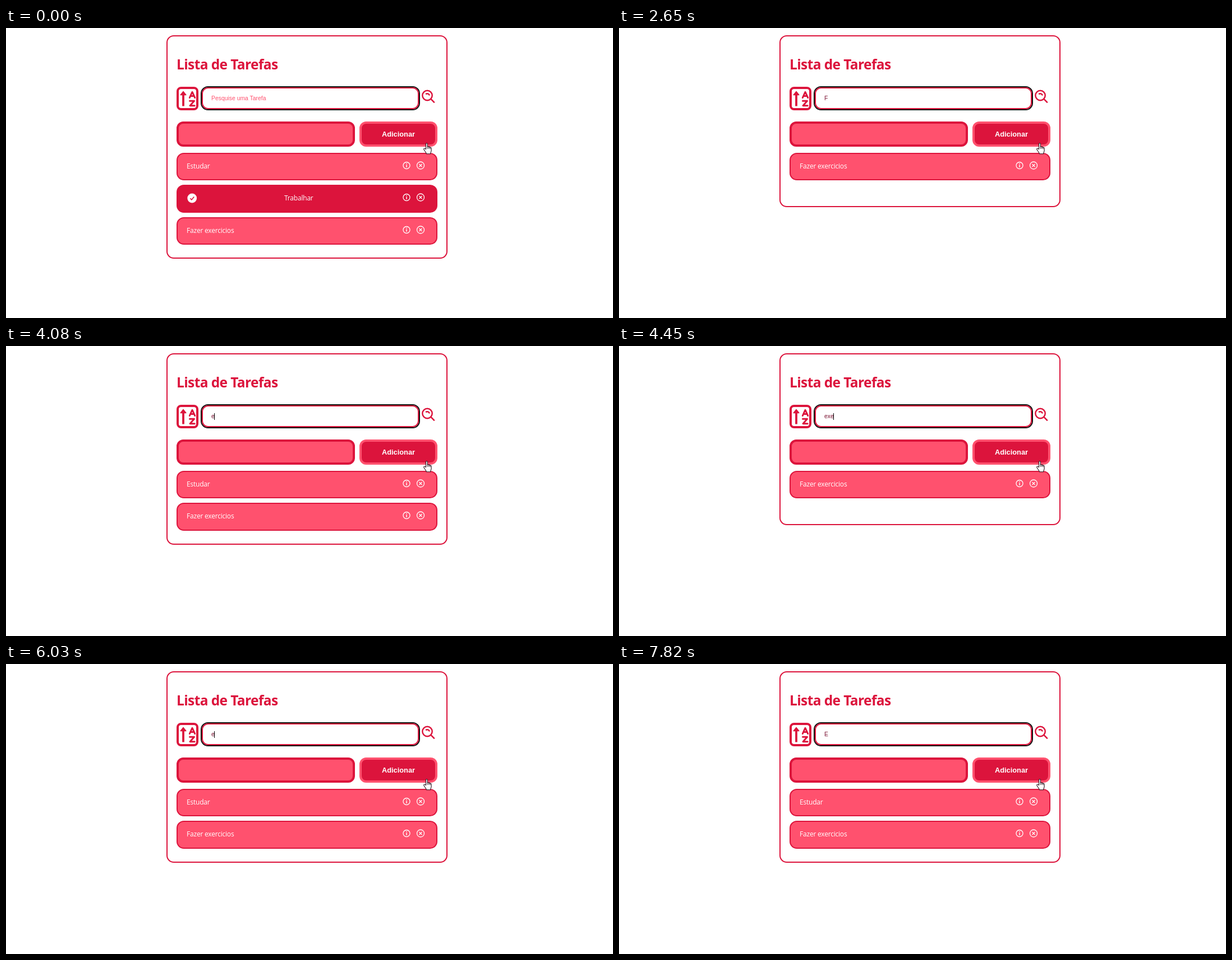
Write an HTML page that moves like this. It is 1082x518 px and loops after 8 s.

```html
<!DOCTYPE html>
<html lang="pt">
<head>
<meta charset="utf-8">
<title>Lista de Tarefas</title>
<style>
:root { --red: #dc143c; --pink: #ff516e; }
html, body { margin: 0; width: 100%; height: 100%; overflow: hidden; background: #fff; }
body * { position: absolute; box-sizing: border-box; white-space: pre; }
svg * { position: static; }
svg { left: 0; top: 0; overflow: visible; }
#card { left: 286px; top: 13px; width: 501px; border: 2px solid var(--red); border-radius: 13px; }
h1 { left: 304px; top: 48px; margin: 0; color: var(--red); font: bold 24.5px/34px "Open Sans", sans-serif; letter-spacing: -.6px; }
#sort { left: 304px; top: 105px; width: 39px; height: 42px; border: 4px solid var(--red); border-radius: 8px; }
#search { left: 347px; top: 104px; width: 391px; height: 43px; border: 2px solid #101010; border-radius: 13px; }
#search::after { content: ""; position: absolute; inset: 0; border: 2px solid var(--red); border-radius: 11px; }
#query { left: 366px; top: 118px; font: 10.4px/15px "Liberation Sans", Arial, sans-serif; color: #7c1433; }
#query.empty { color: var(--pink); }
#caret { top: 120px; width: 1px; height: 12px; }
#entry, #add { top: 167px; height: 45px; border: 4px solid var(--red); border-radius: 12px; background: var(--pink); }
#entry { left: 304px; width: 318px; }
#add { left: 630px; width: 139px; border-color: var(--pink); background: var(--red); color: #fff;
  font: bold 12.8px/37px "Liberation Sans", Arial, sans-serif; text-align: center; }
.task { left: 304px; width: 465px; height: 49.3px; border: 2px solid var(--red); border-radius: 13px; background: var(--pink);
  color: #fff; font: 12px/18px "Open Sans", sans-serif; letter-spacing: -.2px; }
.task span { left: 16px; top: 13px; }
.task.done { background: var(--red); }
.task.done span { left: 190px; }
</style>
</head>
<body>
<div id="card"></div>
<h1>Lista de Tarefas</h1>
<div id="sort"></div>
<div id="search"></div>
<div id="query"></div>
<div id="caret"></div>
<div id="entry"></div>
<div id="add">Adicionar</div>
<div id="list" style="left:0;top:0"></div>
<svg width="1082" height="518" fill="none">
  <g stroke="#dc143c">
    <path d="M316 139.500V117" stroke-width="3.800"/>
    <path d="M316 113.500l-4.800 6h9.600z" fill="#dc143c" stroke-width="1.500" stroke-linejoin="round"/>
    <path d="M327.300 124.500l4.500-10h.4l4.500 10M329.500 121.500h5M327.500 130.300h8l-7.500 8.400h8.200" stroke-width="3" stroke-linejoin="round" stroke-linecap="round"/>
    <circle cx="751" cy="120.500" r="8.700" stroke-width="2.500"/>
    <path d="M757.200 126.700l6.600 6.600M748.200 118.200a4 4 0 0 1 6.600 2.300" stroke-width="2.500"/>
  </g>
  <path d="M748.500 216.500v-9.200c0-2 2.800-2 2.800 0v5c.5-1 2.300-.8 2.500.6.600-.9 2.200-.5 2.300.7.700-.6 2 0 2 1.200v4.200c0 1.700-1.300 2.800-1.500 5.800h-7.200c-.2-2.400-2.700-4.400-4.500-7.800-.8-1.700 1.300-2.700 2.400-1.400z"
    fill="#fff" stroke="#26101a" stroke-width="1.100" stroke-linejoin="round"/>
  <path d="M751.300 212v4M753.800 213v3M756.100 213.800v2.500" stroke="#26101a" stroke-width=".9"/>
</svg>
<script>
const DURATION = 8000;
const TASKS = [{ name: "Estudar" }, { name: "Trabalhar", done: true }, { name: "Fazer exercicios" }];
const CARD_HEIGHT = [307, 307, 342, 399];
const CARET_X = { "": 366, F: 372, e: 371, ex: 376, exe: 382, exer: 386, E: 373 };
// time, typed text, caret visible
const STEPS = [
  [0, "", 0], [290, "", 1], [780, "", 0],
  [1060, "F", 1], [1570, "F", 0], [2080, "F", 1], [2650, "F", 0],
  [3160, "", 0], [3220, "", 1], [3650, "", 0],
  [4080, "e", 1], [4300, "ex", 1], [4450, "exe", 1], [4660, "exer", 1], [5240, "exer", 0],
  [5660, "exe", 0], [5720, "exe", 1], [5810, "ex", 1], [6030, "e", 1],
  [6310, "", 0], [6810, "", 1], [7250, "E", 1], [7820, "E", 0]
];
const $ = id => document.getElementById(id);
const ICONS = `<svg width="461" height="45" fill="none" stroke="#fff" stroke-width="1.3">
  <circle cx="408" cy="20.500" r="6"/><path d="M408 19.500v4.300M408 16.800v1.500" stroke-width="1.500"/>
  <circle cx="433" cy="20.500" r="6.500"/><path d="M430.500 18l5 5m0-5l-5 5"/></svg>`;
const CHECK = `<svg width="40" height="45"><circle cx="25.700" cy="22" r="8.400" fill="#fff"/>
  <path d="M22.300 22.200l2.600 2.600 4.300-5.200" fill="none" stroke="#dc143c" stroke-width="1.600"/></svg>`;

function row(task, i) {
  return `<div class="task ${task.done ? "done" : ""}" style="top:${223 + 57.3 * i}px">` +
    `<span>${task.name}</span>${ICONS}${task.done ? CHECK : ""}</div>`;
}

function show([, text, caret]) {
  const found = TASKS.filter(t => t.name.toLowerCase().includes(text.toLowerCase()));
  $("list").innerHTML = found.map(row).join("");
  $("card").style.height = CARD_HEIGHT[found.length] + "px";
  $("query").textContent = text || "Pesquise uma Tarefa";
  $("query").className = text ? "" : "empty";
  $("caret").style.left = CARET_X[text] + "px";
  $("caret").style.background = !caret ? "none" : text === "F" ? "#dc143c" : "#000";
}

let current;
function tick() {
  const t = performance.now() % DURATION;
  const step = STEPS.findLast(s => s[0] <= t);
  if (step !== current) show(current = step);
  requestAnimationFrame(tick);
}
tick();
</script>
</body>
</html>
```
